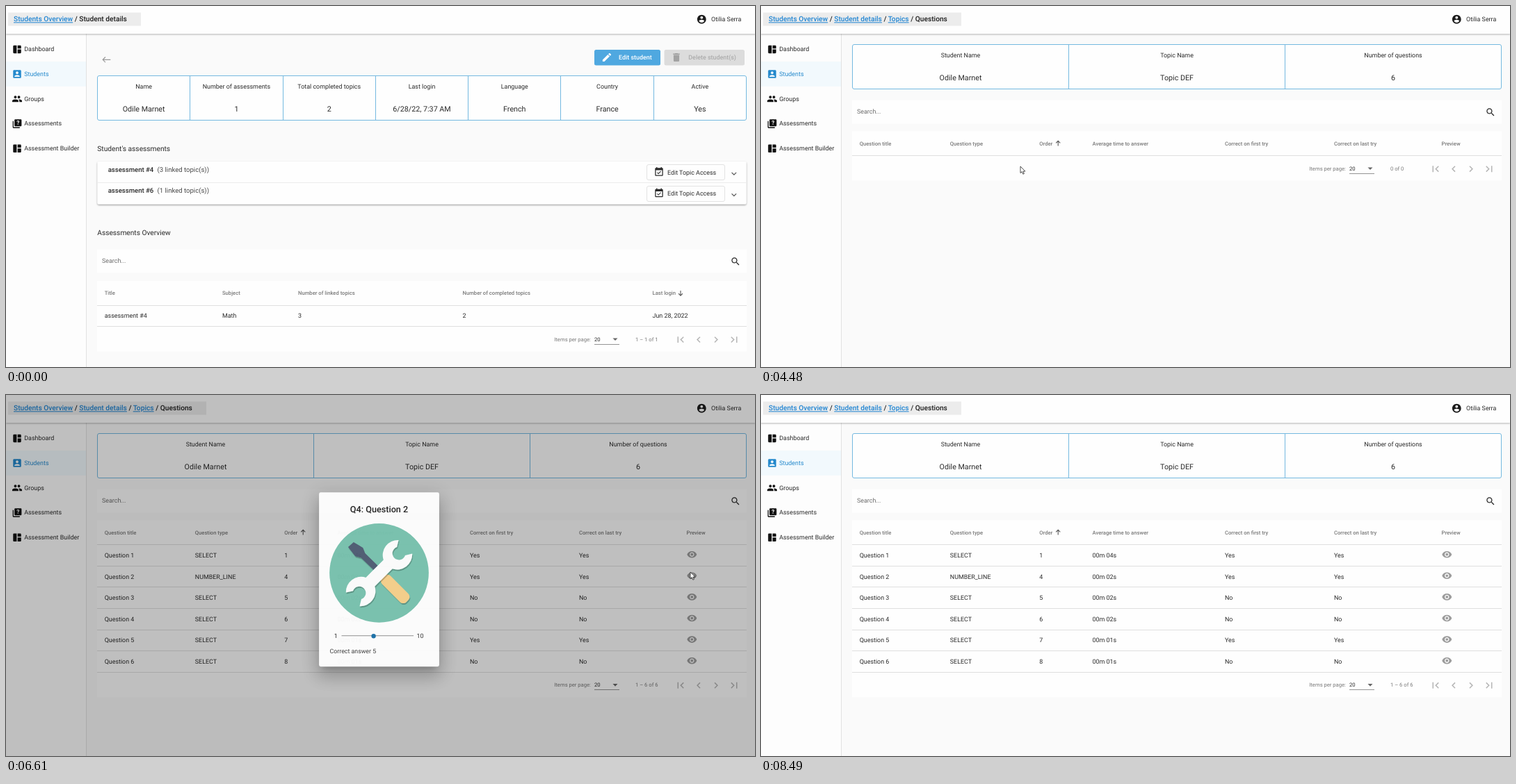
Write an HTML page that moves like this. It is 1077x520 px and loops after 9.23 s.

```html
<!DOCTYPE html>
<html lang="en">
<head>
<meta charset="utf-8">
<title>Student details</title>
<style>
  html, body { margin: 0; width: 100%; height: 100%; overflow: hidden; background: #fafafa; }
  svg { display: block; }
  text { font-family: Roboto, "Open Sans", sans-serif; white-space: pre; text-rendering: geometricPrecision; }
</style>
</head>
<body>
<svg id="stage" width="1077" height="520" viewBox="0 0 1077 520"></svg>
<script>
const LOOP = 9230;
const U = 0.6375;
const INK = '#2a2a2a', GREY = '#7a7a7a', BLUE = '#2489cc', FRAME = '#74b9e0';
const TEACHER = 'Otilia Serra', STUDENT = 'Odile Marnet';

const ICONS = {
  board: 'M11 21H5c-1.1 0-2-.9-2-2V5c0-1.1.9-2 2-2h6v18zm2 0h6c1.1 0 2-.9 2-2v-7h-8v9zm8-11V5c0-1.1-.9-2-2-2h-6v7h8z',
  person: 'M3 5v14c0 1.1.89 2 2 2h14c1.1 0 2-.9 2-2V5c0-1.1-.9-2-2-2H5c-1.11 0-2 .9-2 2zm12 4c0 1.66-1.34 3-3 3s-3-1.34-3-3 1.34-3 3-3 3 1.34 3 3zm-9 8c0-2 4-3.1 6-3.1s6 1.1 6 3.1v1H6v-1z',
  group: 'M16 11c1.66 0 2.99-1.34 2.99-3S17.66 5 16 5c-1.66 0-3 1.34-3 3s1.34 3 3 3zm-8 0c1.66 0 2.99-1.34 2.99-3S9.66 5 8 5C6.34 5 5 6.34 5 8s1.34 3 3 3zm0 2c-2.33 0-7 1.17-7 3.5V19h14v-2.5c0-2.33-4.67-3.5-7-3.5zm8 0c-.29 0-.62.02-.97.05 1.16.84 1.97 1.97 1.97 3.45V19h6v-2.5c0-2.33-4.67-3.5-7-3.5z',
  quiz: 'M4 6H2v14c0 1.1.9 2 2 2h14v-2H4V6zm16-4H8c-1.1 0-2 .9-2 2v12c0 1.1.9 2 2 2h12c1.1 0 2-.9 2-2V4c0-1.1-.9-2-2-2z',
  account: 'M12 2C6.48 2 2 6.48 2 12s4.48 10 10 10 10-4.48 10-10S17.52 2 12 2zm0 3c1.66 0 3 1.34 3 3s-1.34 3-3 3-3-1.34-3-3 1.34-3 3-3zm0 14.2c-2.5 0-4.71-1.28-6-3.22.03-1.99 4-3.08 6-3.08 1.99 0 5.97 1.09 6 3.08-1.29 1.94-3.5 3.22-6 3.22z',
  edit: 'M3 17.25V21h3.75L17.81 9.94l-3.75-3.75L3 17.25zM20.71 7.04c.39-.39.39-1.02 0-1.41l-2.34-2.34c-.39-.39-1.02-.39-1.41 0l-1.83 1.83 3.75 3.75 1.83-1.83z',
  trash: 'M6 19c0 1.1.9 2 2 2h8c1.1 0 2-.9 2-2V7H6v12zM19 4h-3.5l-1-1h-5l-1 1H5v2h14V4z',
  back: 'M9 19l1.41-1.41L5.83 13H22v-2H5.83l4.59-4.59L9 5l-7 7 7 7z',
  event: 'M16.53 11.06L15.47 10l-4.88 4.88-2.12-2.12-1.06 1.06L10.59 17l5.94-5.94zM19 3h-1V1h-2v2H8V1H6v2H5c-1.11 0-1.99.9-1.99 2L3 19c0 1.1.89 2 2 2h14c1.1 0 2-.9 2-2V5c0-1.1-.9-2-2-2zm0 16H5V8h14v11z',
  more: 'M16.59 8.59L12 13.17 7.41 8.59 6 10l6 6 6-6z',
  search: 'M15.5 14h-.79l-.28-.27C15.41 12.59 16 11.11 16 9.5 16 5.91 13.09 3 9.5 3S3 5.91 3 9.5 5.91 16 9.5 16c1.61 0 3.09-.59 4.23-1.57l.27.28v.79l5 4.99L20.49 19l-4.99-5zm-6 0C7.01 14 5 11.99 5 9.5S7.01 5 9.5 5 14 7.01 14 9.5 11.99 14 9.5 14z',
  eye: 'M12 4.5C7 4.5 2.73 7.61 1 12c1.73 4.39 6 7.5 11 7.5s9.27-3.11 11-7.5c-1.73-4.39-6-7.5-11-7.5zM12 17c-2.76 0-5-2.24-5-5s2.24-5 5-5 5 2.24 5 5-2.24 5-5 5zm0-8c-1.66 0-3 1.34-3 3s1.34 3 3 3 3-1.34 3-3-1.34-3-3-3z',
  first: 'M18.41 16.59L13.82 12l4.59-4.59L17 6l-6 6 6 6zM6 6h2v12H6z',
  prev: 'M15.41 7.41L14 6l-6 6 6 6 1.41-1.41L10.83 12z',
  next: 'M10 6L8.59 7.41 13.17 12l-4.58 4.59L10 18l6-6z',
  last: 'M5.59 7.41L10.18 12l-4.59 4.59L7 18l6-6-6-6zM16 6h2v12h-2z'
};

// Text is placed by the middle of its capitals; px is the unscaled size.
const text = (x, y, s, px = 14, fill = INK, weight = 400, extra = '') =>
  `<text x="${x}" y="${y + px * U * 0.355}" font-size="${px * U}" fill="${fill}" font-weight="${weight}" ${extra}>${s}</text>`;
const mid = (x, y, s, px, fill, weight) => text(x, y, s, px, fill, weight, 'text-anchor="middle"');
const rect = (x, y, w, h, fill, extra = '') =>
  `<rect x="${x}" y="${y}" width="${w}" height="${h}" fill="${fill}" ${extra}/>`;
const line = (x1, y1, x2, y2, stroke, w = 1) =>
  `<path d="M${x1} ${y1}L${x2} ${y2}" stroke="${stroke}" stroke-width="${w}" fill="none"/>`;
const icon = (name, x, y, fill = INK, k = U) =>
  `<path d="${ICONS[name]}" fill="${fill}" fill-rule="evenodd" transform="translate(${x} ${y}) scale(${k}) translate(-12 -12)"/>`;
const crisp = v => Math.floor(v) + .5;

function crumbs(width, names) {
  const spans = names.map((n, i) => i < names.length - 1
    ? `<tspan fill="#1f84d2" text-decoration="underline">${n}</tspan> / ` : n).join('');
  return rect(3, 9.5, width, 19, '#ececec') + text(11, 18.7, spans, 16, '#1d1d1d', 500);
}

function cards(top, items) {
  const w = 933 / items.length;
  let s = rect(131.5, top + .5, 933, 64, '#fefefe', `rx="2.5" stroke="${FRAME}"`);
  items.forEach(([label, value], i) => {
    const x = 131.5 + w * i;
    if (i) s += line(crisp(x), top + .5, crisp(x), top + 64.5, FRAME);
    s += mid(x + w / 2, top + 16, label) + mid(x + w / 2, top + 48, value, 16.8);
  });
  return s;
}

const searchBar = y => rect(131, y - 16.5, 934, 33.5, '#fefefe') +
  text(138, y, 'Search...', 14, '#6c6c6c') + icon('search', 1049, y + .7);

function pager(y, range, rule) {
  let s = text(788.3, y, 'Items per page:', 12, GREY) + text(846, y, '20', 12, INK) +
    `<path d="M872.5 ${y - 1.5}h7l-3.5 3.6z" fill="#666"/>` + line(846, crisp(y + 7.3), 882, crisp(y + 7.3), rule) +
    text(905, y, range, 12, GREY);
  ['first', 'prev', 'next', 'last'].forEach((n, i) => {
    s += icon(n, [970, 996, 1021, 1047][i], y + .7, '#b5b5b5', .744);
  });
  return s;
}

function sortArrow(x, y, dir) {
  return `<path d="M0 -3.6V3.4M-3 .4L0 3.4L3 .4" transform="translate(${x} ${y}) scale(1 ${dir})" fill="none" stroke="#555" stroke-width="1.1"/>`;
}

// cols: [x, title]; a cell may be plain text, [text, colour] or null for a preview eye
function table(top, cols, rows, range, rule = '#949494', sort = '') {
  const head = top + 35, step = 30.6, end = head + step * rows.length;
  let s = rect(131, top, 934, end + 36 - top, '#fefefe');
  cols.forEach(([x, title]) => s += text(x, top + 17.2, title, 12, GREY, 500));
  s += sort + line(131, crisp(head), 1065, crisp(head), '#dfdfdf');
  rows.forEach((row, r) => {
    const y = head + step * r + 15.2;
    row.forEach((cell, c) => {
      const x = cols[c][0];
      if (cell === null) s += icon('eye', 986.3, y - 1.2, '#9c9c9c');
      else if (Array.isArray(cell)) s += text(x, y, cell[0], 14, cell[1]);
      else s += text(x, y, cell);
    });
    const b = crisp(head + step * (r + 1));
    s += line(131, b, 1065, b, '#dfdfdf');
  });
  return s + pager(end + 18.3, range, rule);
}

function frame() {
  let s = rect(0, 0, 1077, 520, '#fafafa') + rect(0, 40, 115, 480, '#fdfdfd') +
    line(115.5, 40, 115.5, 520, '#e2e2e2') + rect(0, 80.2, 115, 35.7, '#f2f9fd') +
    rect(0, 0, 1077, 40, '#fefefe', 'filter="url(#bar)"');
  const menu = [['board', 'Dashboard'], ['person', 'Students'], ['group', 'Groups'],
    ['quiz', 'Assessments'], ['board', 'Assessment Builder']];
  menu.forEach(([ic, label], i) => {
    const y = 62 + 35.7 * i, col = i === 1 ? BLUE : INK;
    s += icon(ic, 16, y + .4, i === 1 ? BLUE : '#111') + text(26.2, y, label, 14, col);
    if (ic === 'quiz') s += mid(17.3, y - .8, '?', 13, '#fff', 700);
  });
  return s + icon('account', 1000.3, 19.2, '#1c1c1c') + text(1014, 19, TEACHER);
}

function pageStudent() {
  let s = crumbs(191, ['Students Overview', 'Student details']) + icon('back', 144.3, 77.3, '#9a9a9a', .6);
  s += rect(846, 63, 95, 22.5, '#4fa8e0', 'rx="2.5"') + icon('edit', 864, 74, '#fff', .68) +
    text(881, 74.2, 'Edit student', 14, '#fff', 500);
  s += rect(946.5, 63, 115.5, 22.5, '#dcdcdc', 'rx="2.5"') + icon('trash', 964, 74, '#a3a3a3', .68) +
    text(981.3, 74.2, 'Delete student(s)', 14, '#ababab', 500);
  s += cards(100, [['Name', STUDENT], ['Number of assessments', 1], ['Total completed topics', 2],
    ['Last login', '6/28/22, 7:37 AM'], ['Language', 'French'], ['Country', 'France'], ['Active', 'Yes']]);
  s += text(131.3, 205, 'Student\'s assessments', 16);
  s += rect(131.5, 224, 933, 61.5, '#fefefe', 'rx="2" filter="url(#panel)"') + line(131.5, 254.5, 1064.5, 254.5, '#ececec');
  [['assessment #4', 3], ['assessment #6', 1]].forEach(([name, n], i) => {
    const y = 235.5 + 30.6 * i;
    s += text(146.7, y, name, 15, INK, 500) + text(217.5, y, `(${n} linked topic(s))`, 15, '#484848');
    s += rect(921.5, crisp(y - 7), 112, 22, '#fefefe', 'rx="2.5" stroke="#e2e2e2"') +
      icon('event', 939, y + 3.5) + text(951, y + 4, 'Edit Topic Access') + icon('more', 1046.8, y + 6, '#555', .62);
  });
  s += text(131.3, 326.3, 'Assessments Overview', 16) + searchBar(367.3);
  return s + table(396, [[141.7, 'Title'], [311, 'Subject'], [420, 'Number of linked topics'],
    [656.5, 'Number of completed topics'], [929.5, 'Last login']],
    [['assessment #4', 'Math', '3', '2', 'Jun 28, 2022']], '1 – 1 of 1', '#949494', sortArrow(970, 413.7, 1));
}

function pageTopics(full) {
  const amber = '#f2a440', rust = '#c4561f';
  const rows = full ? [
    ['Topic DEF', '6', '1', ['50%', amber], ['50%', amber], 'Jun 27, 2022'],
    ['Topic ABC', '4', '2', ['25%', rust], ['50%', amber], 'Jun 28, 2022']] : [];
  return crumbs(229.5, ['Students Overview', 'Student details', 'Topics']) +
    cards(55, [['Student Name', STUDENT], ['Assessment Name', 'assessment #4'], ['Accessible topics', 3],
      ['Total completed topics', 2], ['Last login', 'Jun 28, 2022']]) + searchBar(152.3) +
    table(180.7, [[141.7, 'Name'], [232.3, 'Number of questions'], [390.7, 'Number of tries'],
      [518, 'Answered correctly on first try'], [729, 'Answered correctly on last try'], [938, 'Last submission']],
      rows, full ? '1 – 2 of 2' : '0 of 0', '#ad8585');
}

function pageQuestions(full) {
  const data = [[1, 4, 'Yes'], [4, 2, 'Yes'], [5, 2, 'No'], [6, 2, 'No'], [7, 1, 'Yes'], [8, 1, 'No']];
  const rows = full ? data.map(([order, sec, ok], i) =>
    [`Question ${i + 1}`, i === 1 ? 'NUMBER_LINE' : 'SELECT', `${order}`, `00m 0${sec}s`, ok, ok, null]) : [];
  return crumbs(285, ['Students Overview', 'Student details', 'Topics', 'Questions']) +
    cards(55, [['Student Name', STUDENT], ['Topic Name', 'Topic DEF'], ['Number of questions', 6]]) + searchBar(152.3) +
    table(180.7, [[141.7, 'Question title'], [271.8, 'Question type'], [400.3, 'Order'], [476.5, 'Average time to answer'],
      [667, 'Correct on first try'], [824, 'Correct on last try'], [978.5, 'Preview']],
      rows, full ? '1 – 6 of 6' : '0 of 0', '#949494', sortArrow(427.2, 197.8, -1));
}

function dialogArt() {
  const x = 449.3, y = 139, w = 174.4, h = 253.5;
  // dy, spread, blur, alpha
  const lift = [[11, -7, 15, .2], [24, 3, 38, .14], [9, 8, 46, .12]].map(([dy, sp, blur, a]) => {
    const g = sp * U;
    return rect(x - g, y - g + dy * U, w + 2 * g, h + 2 * g, '#000', `opacity="${a}" style="filter:blur(${blur * U / 2}px)"`);
  }).join('');
  const half = 'M-18 9V-9H18A22 22 0 0 1 54 -14L45 -8.5A9.5 9.5 0 1 0 45 8.5L54 14A22 22 0 0 1 18 9Z';
  const wrench = `<path d="${half}"/><path d="${half}" transform="scale(-1 1)"/>`;
  return lift + rect(x, y, w, h, '#fdfdfd', 'rx="2.5"') +
    mid(536.5, 163.7, 'Q4: Question 2', 20, '#222', 500) +
    '<circle cx="536.5" cy="256.3" r="72" fill="#78c2ae"/>' +
    '<g filter="url(#tool)"><path d="M491.5 218.5L499.5 211.5L513 219.5L516 227.5L535 246L529 252L510 234L502 232Z" fill="#4f5b73"/>' +
    '<g transform="translate(536.5 256) rotate(45)">' +
    rect(8, -8.5, 50, 17, '#f5cf8a', 'rx="6.5"') + '</g></g>' +
    `<g filter="url(#tool)"><g transform="translate(536.5 256.5) rotate(-45)" fill="#fcfcfc">${wrench}</g></g>` +
    text(471.2, 347.3, '1') + text(591, 347.3, '10') + line(482, 347.5, 586.5, 347.5, '#8f8f8f') +
    '<circle cx="528.5" cy="348" r="3.2" fill="#1a70a8"/>' + text(464.8, 369.8, 'Correct answer 5', 14, '#3c3c3c');
}

const shadow = (id, dx, dy, blur, alpha) =>
  `<filter id="${id}" x="-20%" y="-30%" width="140%" height="180%"><feDropShadow dx="${dx}" dy="${dy}" stdDeviation="${blur}" flood-color="#000" flood-opacity="${alpha}"/></filter>`;
const group = (id, body) => `<g id="${id}">${body}</g>`;

document.getElementById('stage').innerHTML =
  `<defs>${shadow('bar', 0, 1.2, 1.2, .26)}${shadow('panel', 0, 1.2, 1, .42)}${shadow('tool', .8, 2, .5, .25)}</defs>` +
  frame() + group('student', pageStudent()) +
  group('topicsEmpty', pageTopics(false)) + group('topics', pageTopics(true)) +
  group('questionsEmpty', pageQuestions(false)) + group('questions', pageQuestions(true)) +
  rect(0, 0, 1077, 520, '#000', 'id="shade"') + group('dialog', dialogArt()) +
  group('cursor',
    '<path id="arrow" d="M0 0V9.6L2.2 7.6L3.8 11.2L5.4 10.5L3.9 7.1H6.9Z" fill="#fff" stroke="#222" stroke-width=".8"/>' +
    '<path id="hand" d="M-1.2 1a1.2 1.2 0 0 1 2.4 0V5l4 1q1.2 .4 1.1 1.7L5.5 11l-.7 3H-.3L-3 9.5q-1-1.6-.2-2.1t2 1z" fill="#fff" stroke="#222" stroke-width=".8"/>');

const el = id => document.getElementById(id);
const show = (id, on) => { el(id).style.display = on ? '' : 'none'; };
const clamp = v => Math.min(1, Math.max(0, v));

function bezier(x1, y1, x2, y2) {
  const f = (a, b, s) => 3 * (1 - s) * (1 - s) * s * a + 3 * (1 - s) * s * s * b + s * s * s;
  return x => {
    let lo = 0, hi = 1;
    for (let i = 0; i < 24; i++) {
      const m = (lo + hi) / 2;
      if (f(x1, x2, m) < x) lo = m; else hi = m;
    }
    return x <= 0 ? 0 : x >= 1 ? 1 : f(y1, y2, lo);
  };
}
const fade = bezier(.25, .8, .25, 1), grow = bezier(0, 0, .2, 1);

const TICKS = [[360, 1200, 13], [2470, 3280, 13], [5090, 6010, 15], [6080, 6820, 12], [7960, 8490, 9]];
function held(t) {
  for (const [a, b, n] of TICKS) {
    if (t < a || t >= b) continue;
    const d = (b - a) / (n - 1);
    return a + Math.floor((t - a) / d + .2) * d;
  }
  return t;
}

const PAGES = [[0, 'student'], [1680, 'topicsEmpty'], [1740, 'topics'], [4280, 'questionsEmpty'], [4620, 'questions']];

// from, to, start, bend, end, easing
const smooth = p => p * p * (3 - 2 * p);
const MOVES = [
  [360, 1200, [592, 500], [205, 410], [249, 445], smooth],
  [2470, 3280, [249, 445], [300, 330], [373, 231], smooth],
  [5090, 6010, [373, 231], [678, 274], [984, 255], p => 1 - (1 - p) ** 2.3]
];
function cursorAt(t) {
  const m = MOVES.filter(v => t >= v[0]).pop() || MOVES[0];
  const e = m[5](clamp((t - m[0]) / (m[1] - m[0])));
  return [0, 1].map(i => (1 - e) ** 2 * m[2][i] + 2 * e * (1 - e) * m[3][i] + e * e * m[4][i]);
}
function isHand(t, y) {
  if (t < 1470) return y < 462;
  if (t < 2470) return false;
  if (t < 3950) return y < 277;
  return t >= 4620 && (t < 6480 || t >= 8020);
}

const OPEN = 6503, CLOSE = 8021;
function draw(t) {
  const page = PAGES.filter(p => t >= p[0]).pop()[1];
  PAGES.forEach(p => show(p[1], p[1] === page));

  const h = held(t);
  const [x, y] = cursorAt(h);
  const hand = isHand(t, y);
  show('cursor', t >= 360 && t < 8490);
  show('hand', hand);
  show('arrow', !hand);
  el('cursor').setAttribute('transform', `translate(${x.toFixed(2)} ${y.toFixed(2)})`);

  const g = grow((h - OPEN) / 150), k = .7 + .3 * g;
  el('shade').setAttribute('opacity', .32 * fade((h - OPEN) / 400) * (1 - fade((h - CLOSE) / 400)));
  el('dialog').setAttribute('opacity', g * (1 - clamp((h - CLOSE) / 75) ** 1.3));
  el('dialog').setAttribute('transform', `translate(536.5 265.7) scale(${k}) translate(-536.5 -265.7)`);
}

const start = performance.now();
function tick() {
  draw((performance.now() - start) % LOOP);
  requestAnimationFrame(tick);
}
tick();
</script>
</body>
</html>
```
